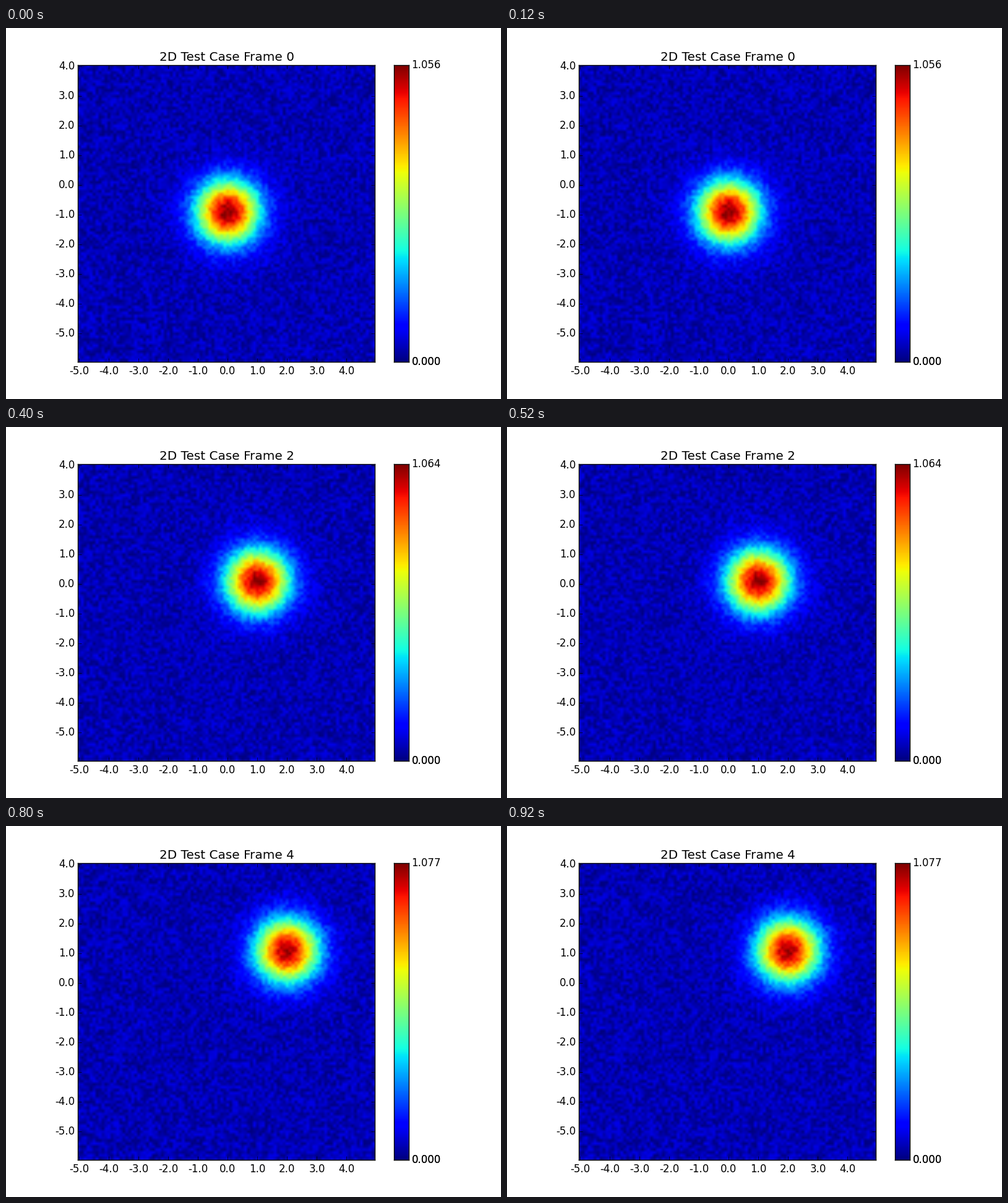
Write a matplotlib script that moves like this. It is 800 by 600 pixels and loops after 1000 ms.

```python
import numpy as np
import matplotlib.pyplot as plt
from matplotlib.animation import FuncAnimation

W, H, DPI = 800, 600, 100
CELLS, STEP = 100, 0.1
X0, Y0 = -5.0, -5.9            # centre of the lowest left cell
SIGMA = 0.75
PEAKS = [1.056, 1.078, 1.064, 1.064, 1.077]
LABEL_PAD = 3.3

plt.style.use("classic")
plt.rcParams.update({"font.family": "DejaVu Sans", "font.size": 12})

fig = plt.figure(figsize=(W / DPI, H / DPI), dpi=DPI, facecolor="white")


def add_box(left, bottom, width, height):
    return fig.add_axes([left / W, bottom / H, width / W, height / H])


x, y = np.meshgrid(X0 + STEP * np.arange(CELLS), Y0 + STEP * np.arange(CELLS))


def field(i):
    """Gaussian spot over uniform noise."""
    r2 = (x - 0.5 * i) ** 2 + (y + 0.9 - 0.5 * i) ** 2
    noise = np.random.RandomState(i).uniform(0, 0.1, x.shape)
    return np.exp(-r2 / (2 * SIGMA ** 2)) + noise


ax = add_box(116, 60, 480, 480)
half, span = STEP / 2, CELLS * STEP
image = ax.imshow(
    field(0), cmap="jet", vmin=0, vmax=PEAKS[0], origin="lower",
    extent=(X0 - half, X0 - half + span, Y0 - half, Y0 - half + span),
    interpolation="bilinear", interpolation_stage="rgba", aspect="auto")
ticks = range(-5, 5)
labels = [f"{t:.1f}" for t in ticks]
ax.set_xticks(ticks, labels)
ax.set_yticks(ticks, labels)
ax.tick_params(axis="y", pad=LABEL_PAD)
title = ax.set_title("", x=0.5 + 1 / 480)

bar = add_box(627, 60, 24, 480)
bar.imshow(np.linspace(0, 1, 256)[:, None], cmap="jet", origin="lower",
           extent=(0, 1, 0, 1), interpolation="nearest", aspect="auto")
bar.set_xticks([])
bar.yaxis.tick_right()
bar.tick_params(axis="y", pad=LABEL_PAD)


def update(i):
    image.set_data(field(i))
    image.set_clim(0, PEAKS[i])
    title.set_text(f"2D Test Case Frame {i}")
    # The scale's zero and the data minimum print on top of each other.
    bar.set_yticks([0, 1e-5, 1], ["0.000", "0.000", f"{PEAKS[i]:.3f}"])
    return image, title


anim = FuncAnimation(fig, update, frames=len(PEAKS), interval=200, repeat=True)
plt.show()
```
